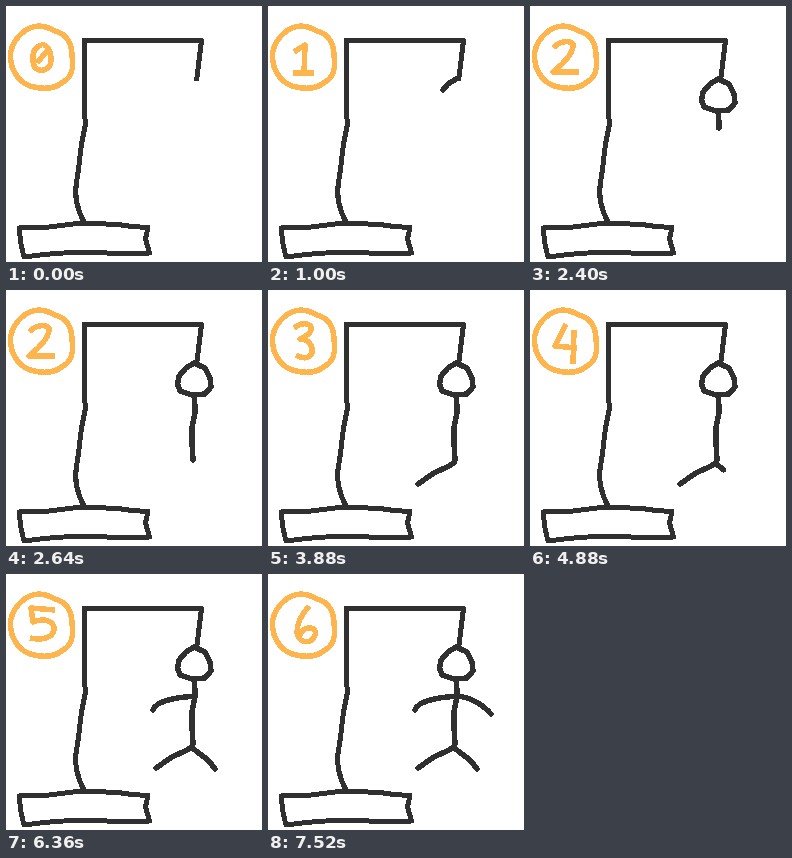
Recreate the animation shown at these times as an HTML page. Size 256 px wide and 256 px high, loop 8000 ms.

```html
<!DOCTYPE html>
<html lang="en">
<head>
<meta charset="utf-8">
<title>Hangman</title>
<style>
  html, body { margin: 0; width: 100%; height: 100%; overflow: hidden; background: #fff; }
  svg { display: block; width: 100vw; height: 100vh; }
  path { fill: none; stroke-width: 5; stroke-linejoin: round; shape-rendering: crispEdges; }
  .ink { stroke: #303030; }
  .limb { stroke-width: 5.5; stroke-linecap: round; }
  .badge { stroke: #ffb54d; stroke-width: 5.5; }
</style>
</head>
<body>
<svg viewBox="0 0 256 256">
  <path class="ink" d="M190.500 75L195.500 34.500H76M78.500 34.500V108L79.500 118Q78 126 75.500 138L74 150Q73 162 70.500 176Q67 196 78.500 217"/>
  <path class="ink" d="M13 222L43 221L67 218L88 217.500L112 218.500L126 220.500L142 221.500L139.500 233L143.500 247Q112 248 78 246Q46 247 18 251L15 238Z"/>
  <path class="badge" d="M24 22C33 18 42 21 49 25C61 28 66 38 66 50C68 62 65 72 57 76C49 83 37 83 28 81C16 79 7 68 5 56C2 42 11 28 24 22Z"/>
  <path class="badge" id="digit"/>
</svg>
<script>
const LOOP = 8000, STEP = 80;

const digits = [
  "M36 39C28 40 26 49 27 56C28 65 37 66 42 62C47 57 45 45 41 41Q38 38 36 39M41 45L31 57",
  "M26 46L37 39L36 67M25 67L46 67",
  "M23 42C30 35 39 34 43 38C44 46 34 57 23 66L49 66",
  "M26 38C32 33 40 32 43 37C44 42 39 46 32 49C41 49 45 56 44 63C41 69 35 69 28 65",
  "M36 34L25 56L47 58M44 40L43 74",
  "M49 36L25 34L27 48C37 44 46 46 48 53C49 63 38 67 24 64",
  "M41 32C33 41 29 50 29 58C30 67 37 69 42 67C49 63 49 54 43 54C37 53 33 58 31 63"
];

// Each limb: start time, path, share drawn after each step
const thirds = [1 / 3, 2 / 3, 1], quarters = [.25, .5, .75, 1];
const limbs = [
  [1000, "M188 73L180 78L173 86L171.500 94L174 101L186 105L199 104L205 97L204 88L199 78L188 73", [1, 2, 3, 4, 5, 6].map(n => n / 6)],
  [2400, "M188.500 106L189 122L186 138L186 152L187 170", quarters],
  [3640, "M186 173L181 176L166 183L150 194", quarters],
  [4880, "M185 173L194 180Q203 186 209 195", thirds],
  [6040, "M188 122L180 123Q164 124 152 130Q148 133 147 136", [.2, .52, .86, .86, 1]],
  [7360, "M188 122Q200 123 208 128Q216 132 223 140", thirds]
].map(([start, d, shares]) => {
  const path = document.createElementNS("http://www.w3.org/2000/svg", "path");
  path.setAttribute("class", "ink limb");
  path.setAttribute("d", d);
  document.querySelector("svg").append(path);
  return { start, shares, path, length: path.getTotalLength() };
});

const digit = document.getElementById("digit");

function draw(now) {
  const t = now % LOOP;
  let count = 0;
  for (const { start, shares, path, length } of limbs) {
    const step = Math.floor((t - start) / STEP);
    path.style.display = step < 0 ? "none" : "";
    if (step < 0) continue;
    count++;
    const share = shares[Math.min(step, shares.length - 1)];
    path.style.strokeDasharray = share < 1 ? `${share * length} ${length * 2}` : "none";
  }
  digit.setAttribute("d", digits[count]);
}

const origin = performance.now();
function tick() {
  draw(performance.now() - origin);
  requestAnimationFrame(tick);
}
tick();
</script>
</body>
</html>
```
